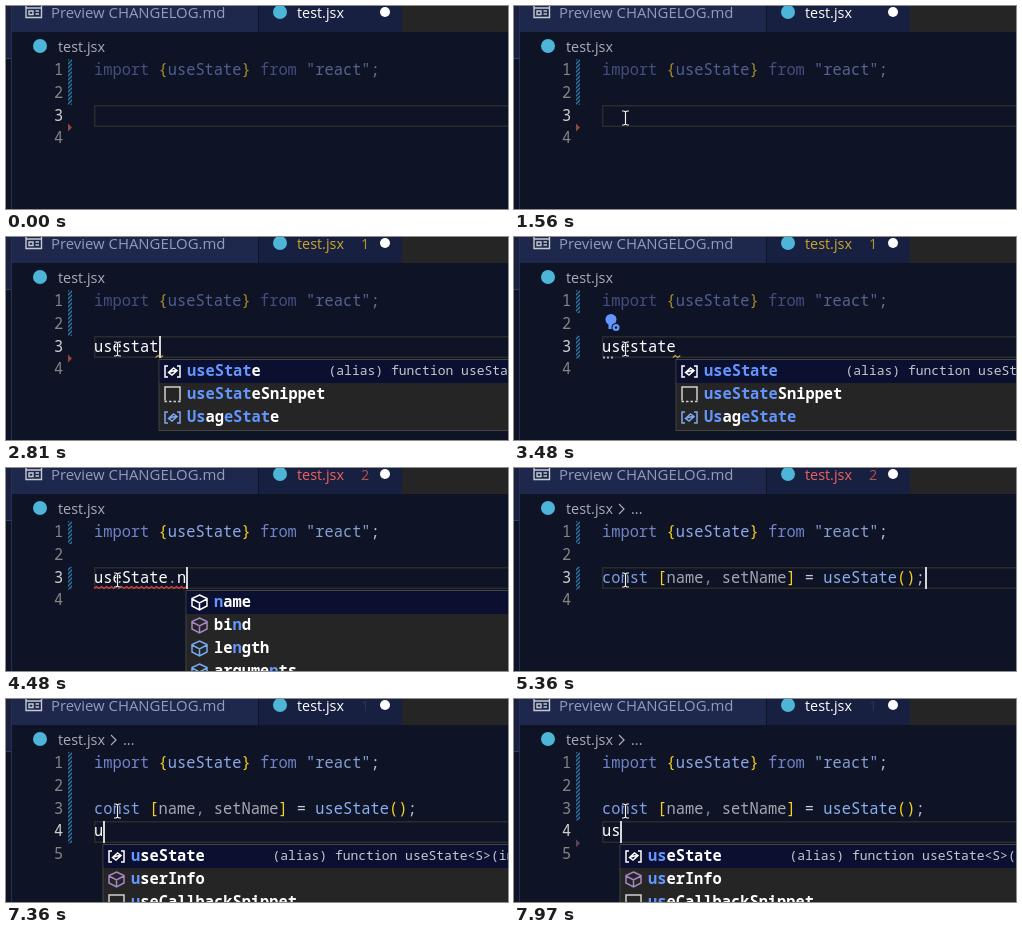
Recreate the animation shown at these times as an HTML page with a canvas. Size 502 by 203 pixels, loop 8000 ms.

```html
<!DOCTYPE html>
<html lang="en">
<head>
<meta charset="utf-8">
<title>Editor autocomplete</title>
<style>
html, body { margin: 0; width: 502px; height: 203px; overflow: hidden; background: #0f1326; }
canvas { display: block; }
</style>
</head>
<body>
<canvas id="stage" width="502" height="203"></canvas>
<script>
const ctx = document.getElementById('stage').getContext('2d');
const LOOP = 8000, TICK = 66.7;
const MONO = '"Noto Sans Mono", "DejaVu Sans Mono", monospace';
const CODE = '15.36px ' + MONO, CODE_MEDIUM = '500 ' + CODE, CODE_BOLD = '600 ' + CODE, DETAIL = '13px ' + MONO;
const SANS = '"Open Sans", "Noto Sans", sans-serif', UI = '14.4px ' + SANS, UI_LARGE = '14.9px ' + SANS;
const LEFT = 88, CHAR = 9.22, LINE = 22.75;
const BG = '#0f1326', WHITE = '#fff', GREY = '#858585', GOLD = '#f7d21a', BLUE = '#6496ff';
const lineTop = n => 53.3 + LINE * (n - 1);

const HOOKS = 'v useState,m userInfo,s useCallbackSnippet,s useContextSnippet';
const STATES = 'v useState,s useStateSnippet,s useRefSnippet,s useMemoSnippet';
const STATES_ONLY = 'v useState,s useStateSnippet,v UsageState';
const MEMBERS = 'm apply,f arguments,m bind,m call';
const N_MEMBERS = 'f name,m bind,f length,f arguments';
const clean = { title: '#fff', count: '' };
const warning = { title: '#cca72a', count: '1', countColor: '#b3942c' };
const error = { title: '#f0615c', count: '2', countColor: '#b94f50' };
const hint = { title: '#fff', count: '1', countColor: '#26345f' };

const start = {
  line: 3, text: '', list: '', caret: false, tab: clean, stripes: [1, 2], arrow: 3,
  used: false, bulb: false, dots: false, wave: false, crumb: false, done: false, dimNames: false
};
const typed = (text, list, more) => ({ text, list, caret: true, ...more });
const steps = [
  [1030, { caret: true }],
  [1560, { caret: false }],
  [2020, typed('u', '')],
  [2090, { list: HOOKS }],
  [2150, typed('us', HOOKS)],
  [2280, typed('use', HOOKS, { tab: warning })],
  [2480, typed('uses', STATES)],
  [2610, typed('usest', STATES_ONLY)],
  [2740, typed('usesta', STATES_ONLY)],
  [2810, typed('usestat', STATES_ONLY)],
  [2940, typed('usestate', STATES_ONLY)],
  [3140, { stripes: [1, 3], arrow: 0 }],
  [3210, { bulb: true }],
  [3350, { dots: true }],
  [3480, { caret: false }],
  [3940, typed('useState', '', { bulb: false, dots: false })],
  [4010, { used: true, tab: clean }],
  [4210, typed('useState.', '')],
  [4280, { list: MEMBERS }],
  [4410, { tab: error, wave: true }],
  [4480, typed('useState.n', N_MEMBERS)],
  [4550, typed('useState.na', 'f name')],
  [4680, typed('useState.nam', 'f name')],
  [4750, typed('useState.name', 'f name')],
  [5010, typed('const [name, setName] = useState();', '', { done: true, wave: false })],
  [5360, { crumb: true, dimNames: true }],
  [5430, { tab: clean }],
  [5500, { caret: false }],
  [5960, { caret: true }],
  [6230, typed('', '', { line: 4 })],
  [6430, { stripes: [1, 2, 3], arrow: 4 }],
  [6690, { caret: false }],
  [6830, typed('u', '', { dots: true })],
  [6900, typed('u', HOOKS)],
  [6960, typed('us', HOOKS, { dots: false })],
  [7090, typed('use', HOOKS, { tab: hint, stripes: [1, 2, 3, 4], arrow: 0 })],
  [7290, typed('us', HOOKS)],
  [7360, typed('u', HOOKS)],
  [7430, typed('', '')],
  [7570, { stripes: [1, 2, 3], arrow: 4 }],
  [7830, typed('u', '')],
  [7900, { list: HOOKS }],
  [7970, typed('us', HOOKS)]
];
const mousePath = [[130, 322, 186], [480, 200, 151], [700, 106, 84], [900, 112, 108], [1030, 115, 111], [1230, 111, 112]];

function rect(x, y, w, h, color) {
  ctx.fillStyle = color;
  ctx.fillRect(x, y, w, h);
}
function disc(x, y, r, color) {
  ctx.fillStyle = color;
  ctx.beginPath();
  ctx.arc(x, y, r, 0, 7);
  ctx.fill();
}
function stroke(path, color, width = 1.2, x = 0, y = 0) {
  ctx.save();
  ctx.translate(x, y);
  ctx.strokeStyle = color;
  ctx.lineWidth = width;
  ctx.stroke(new Path2D(path));
  ctx.restore();
}
function write(text, x, y, color, font) {
  ctx.font = font;
  ctx.fillStyle = color;
  ctx.fillText(text, x, y);
}
// Each span is [text, color]; all sit on the monospace grid.
function code(spans, x, y, font) {
  for (const [text, color] of spans) {
    write(text, x, y, color, font);
    x += text.length * CHAR;
  }
}
const codeLine = (spans, n) => code(spans, LEFT, lineTop(n) + 15.8, CODE_MEDIUM);

function frame(s) {
  rect(0, 0, 502, 203, BG);
  rect(0, 0, 5, 52, '#1a2140');
  rect(0, 52, 5, 1, '#323c60');
  rect(5, 0, 1, 203, '#27304f');
  rect(6, 0, 246, 26, '#1e284c');
  rect(253, 0, 143, 26, '#172040');
  rect(396, 0, 106, 26, '#252526');
  stroke('M20 -2H35.500V11.500H20ZM20 2H35.500M23 5H27V8.500H23ZM29.500 5H33M29.500 8H33', '#c5c9d2', 1.4);
  write('Preview CHANGELOG.md', 45, 12, '#929cbd', UI_LARGE);
  disc(274, 6, 7, '#4cb5d8');
  write('test.jsx', 291, 12, s.tab.title, UI);
  if (s.tab.count) write(s.tab.count, 355, 12, s.tab.countColor, UI);
  disc(379, 6, 5, '#fff');
  disc(34, 40, 7, '#4cb5d8');
  write('test.jsx', 52, 46, '#a9adb8', UI);
  if (s.crumb) {
    stroke('M105 36L110 41L105 46', '#a9adb8');
    write('...', 117, 46, '#a9adb8', UI);
  }
}

function gutter(s) {
  for (let n = 1; n <= (s.line > 3 ? 5 : 4); n++)
    write(String(n), 48, lineTop(n) + 15.8, n === s.line ? '#d0d0d0' : GREY, CODE);
  ctx.save();
  ctx.beginPath();
  for (const n of s.stripes) ctx.rect(62, lineTop(n), 4, LINE);
  ctx.clip();
  for (let y = 50; y < 150; y += 4) stroke('M61 5L67 -1', '#2f78a4', 1.3, 0, y);
  ctx.restore();
  if (s.arrow) {
    ctx.fillStyle = s.arrow === 3 ? '#94463c' : '#5d4258';
    ctx.fill(new Path2D(`M62 ${lineTop(s.arrow + 1) - 4}l4 4l-4 4z`));
  }
}

function wave(x, end, y, color) {
  let path = `M${x} ${y}`;
  for (let i = 0; x < end; x += 2.5) path += `l2.500 ${i++ % 2 ? 2 : -2}`;
  stroke(path, color, 1.1);
}

function text(s) {
  const top = lineTop(s.line), bottom = top + LINE;
  ctx.strokeStyle = '#2a2b2a';
  ctx.lineWidth = 1.5;
  ctx.strokeRect(LEFT + 0.75, Math.round(top) + 0.75, 430, 20.5);

  const [key, name, str, semi, brace] = s.used
    ? ['#6f83c6', '#8fa9e6', '#86a0d0', '#b5bccb', GOLD]
    : ['#434e80', '#505f92', '#54648f', '#69728a', '#a88f2a'];
  codeLine([['import ', key], ['{', brace], ['useState', name], ['}', brace],
    [' from ', key], ['"react"', str], [';', semi]], 1);
  if (s.done) {
    const id = s.dimNames ? '#a5a9b1' : WHITE;
    codeLine([['const ', '#7f9fe2'], ['[', GOLD], ['name', id], [', ', '#858b9b'], ['setName', id],
      [']', GOLD], [' = ', '#c3c9d6'], ['useState', '#8ab0ee'], ['()', GOLD], [';', '#b5bccb']], 3);
  }
  if (!s.done || s.line > 3) {
    const [word, member] = s.text.split('.');
    codeLine([[word, WHITE]].concat(member === undefined ? [] : [['.', '#9aa3b5'], [member, WHITE]]), s.line);
  }
  const end = LEFT + s.text.length * CHAR;
  if (s.dots) for (let i = 0; i < 3; i++) rect(LEFT + 1 + i * 4, bottom - 2, 2, 2, '#a9adb5');
  if (s.tab === warning && s.text) wave(end - 3, end + 4, bottom - 1, '#cca73a');
  if (s.wave) wave(LEFT, end, bottom - 1, '#e0453f');
  if (s.bulb) {
    disc(97, 82.5, 5.5, BLUE);
    rect(94.5, 86, 5, 6, BLUE);
    disc(102, 90.5, 4.5, BG);
    disc(102, 90.5, 3.5, BLUE);
    disc(102, 90.5, 1.2, BG);
  }
  if (s.caret) rect(Math.round(end), Math.round(top), 2, 22, '#d4d6da');
}

const cube = 'M0 -7.500L7.500 -4V3.500L0 7.500L-7.500 3.500V-4ZM-7.500 -3.500L0 0.500L7.500 -3.500M0 0.500V7.500';
const icons = {
  v: ['M-4.500 -5.500H-7.500V5.500H-4.500M4.500 -5.500H7.500V5.500H4.500M-4 1L1 -3.500L4.500 -1L-0.500 3.500ZM-4 1L0.500 -0.500L4.500 -1', '#7fa6f2'],
  s: ['M-7.500 6V-7.500H7.500V6M-8 7H-5.500M-3.500 7H-1M1 7H3.500M5.500 7H8', '#d0d0d0'],
  f: [cube, '#75a9f0'],
  m: [cube, '#a585c4']
};

// Letters that match the query, in order, are blue.
function highlight(label, query) {
  let i = 0;
  return [...label].map(c => {
    const hit = i < query.length && c.toLowerCase() === query[i].toLowerCase();
    if (hit) i++;
    return [c, hit ? BLUE : WHITE];
  });
}

function popup(s) {
  if (!s.list) return;
  const rows = s.list.split(','), query = s.text.split('.').pop();
  const x = Math.round(LEFT + s.text.length * CHAR) - 0.5, y = Math.ceil(lineTop(s.line) + LINE);
  rect(x, y, 540, rows.length * 23 + 3, '#454545');
  rect(x + 1, y + 1, 538, rows.length * 23 + 1, '#252526');
  rect(x + 1, y + 1, 538, 23, '#0b1030');
  rows.forEach((row, i) => {
    const [kind, label] = row.split(' '), [shape, color] = icons[kind], middle = y + 12 + i * 23;
    stroke(shape, i ? color : '#fff', 1.5, x + 14, middle + 0.5);
    code(highlight(label, query), x + 28.5, middle + 5, CODE_BOLD);
    if (!i && label === 'useState')
      write('(alias) function useState<S>(initialState', x + 170, middle + 4, '#c6c8ce', DETAIL);
  });
}

function mouse(t) {
  if (t < mousePath[0][0]) return;
  let [, x, y] = mousePath[mousePath.length - 1];
  const i = mousePath.findIndex(p => p[0] > t);
  if (i > 0) {
    const [t0, x0, y0] = mousePath[i - 1], [t1, x1, y1] = mousePath[i], k = (t - t0) / (t1 - t0);
    x = Math.round(x0 + (x1 - x0) * k);
    y = Math.round(y0 + (y1 - y0) * k);
  }
  const beam = 'M-3 -7H-1L0.500 -6L2 -7H4M0.500 -6V6M-3 7H-1L0.500 6L2 7H4';
  stroke(beam, '#0a0c14', 2.4, x, y);
  stroke(beam, '#f4f4f4', 1.2, x, y);
}

function draw() {
  const t = performance.now() % LOOP;
  const s = Object.assign({}, start, ...steps.filter(step => step[0] <= t).map(step => step[1]));
  frame(s);
  gutter(s);
  text(s);
  popup(s);
  mouse(Math.floor(t / TICK) * TICK + 1);
  requestAnimationFrame(draw);
}
draw();
</script>
</body>
</html>
```
